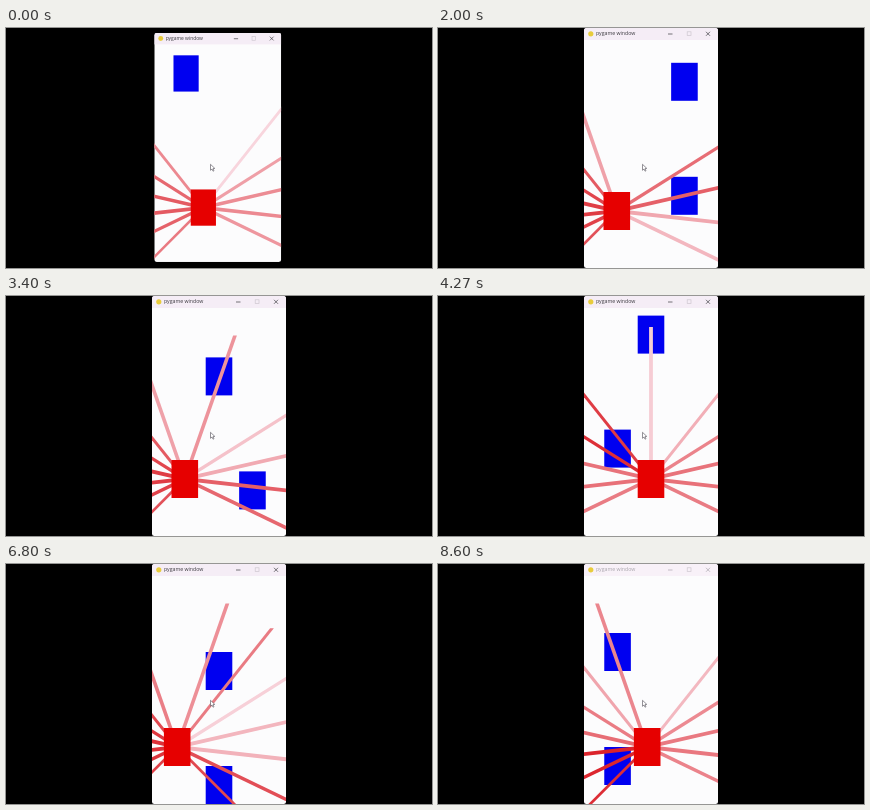
These frames come from a looping animation (426 by 240 pixels, 8670 ms). An HTML page with a canvas:

```html
<!DOCTYPE html>
<html lang="en">
<head>
<meta charset="utf-8">
<title>Lane dodger</title>
<style>
  html, body { margin: 0; width: 100%; height: 100%; overflow: hidden; background: #000; }
  canvas { display: block; width: 426px; height: 240px; }
</style>
</head>
<body>
<canvas id="stage" width="426" height="240"></canvas>
<script>
const ctx = document.getElementById('stage').getContext('2d');
const LOOP = 8670, TICK = 1000 / 15;

// World units: a 350 x 600 road, shown at 0.38 scale under the title bar.
const ROAD = { w: 350, h: 600 }, CAR = { w: 70, h: 100 };
const SCALE = 0.38, SPEED = 10, SPACING = 30, CAR_Y = 400;
const LANES = [52, 140, 228];
const RAYS = 15, RAY_LENGTH = 400, RAY_WIDTH = 10;

// [tick, simulation step]
const PACE = [[0, 0], [30, 183], [51, 310], [64, 389], [84, 510], [102, 617], [123, 744], [129, 762]];

// One lane per obstacle, and where the player waits while it passes.
const OBSTACLES = '01201220121201210201120100';
const DODGES = [130, 50, 50, 130, 50, 50, 50, 130, 50, 50, 50, 50, 140,
                50, 50, 50, 130, 130, 130, 30, 30, 30, 130, 50, 130, 130];

function stepAt(tick) {
  const i = Math.max(1, PACE.findIndex(([t]) => t >= tick));
  const [t0, s0] = PACE[i - 1], [t1, s1] = PACE[i];
  return Math.round(s0 + (s1 - s0) * (tick - t0) / (t1 - t0));
}

function playerX(step) {
  let x = 100;
  DODGES.forEach((goal, k) => {
    const moved = SPEED * Math.min(SPACING, step - SPACING * k - 17);
    if (moved > 0) x += Math.sign(goal - x) * Math.min(moved, Math.abs(goal - x));
  });
  return x;
}

function visibleObstacles(step) {
  return [...OBSTACLES]
    .map((lane, k) => ({ x: LANES[lane], y: 30 + SPEED * (step - SPACING * k) }))
    .filter(o => o.y > -CAR.h && o.y < ROAD.h);
}

// Distance along a ray to a box, or Infinity.
function boxDistance(ox, oy, dx, dy, box) {
  let near = 0, far = RAY_LENGTH;
  for (const [o, d, lo, hi] of [[ox, dx, box.x, box.x + CAR.w], [oy, dy, box.y, box.y + CAR.h]]) {
    if (Math.abs(d) < 1e-6) {
      if (o < lo || o > hi) return Infinity;
      continue;
    }
    const a = (lo - o) / d, b = (hi - o) / d;
    near = Math.max(near, Math.min(a, b));
    far = Math.min(far, Math.max(a, b));
  }
  return near <= far ? near : Infinity;
}

function wallDistance(ox, oy, dx, dy) {
  if (Math.abs(dx) < 1e-6) return Infinity;
  const d = ((dx > 0 ? ROAD.w : 0) - ox) / dx;
  return d <= RAY_LENGTH && oy + d * dy <= ROAD.h ? d : Infinity;
}

function drawRay(ox, oy, dx, dy, distance) {
  const u = distance / RAY_LENGTH, pale = Math.round(10 + 235 * u);
  const ex = ox + dx * RAY_LENGTH, ey = oy + dy * RAY_LENGTH;
  const steep = Math.abs(dy) > Math.abs(dx);
  const wx = steep ? RAY_WIDTH / 2 : 0, wy = steep ? 0 : RAY_WIDTH / 2;
  ctx.fillStyle = `rgb(${Math.round(215 + 38 * u)}, ${pale}, ${pale + 8})`;
  ctx.beginPath();
  ctx.moveTo(ox - wx, oy - wy);
  ctx.lineTo(ex - wx, ey - wy);
  ctx.lineTo(ex + wx, ey + wy);
  ctx.lineTo(ox + wx, oy + wy);
  ctx.fill();
}

function drawRoad(step) {
  const obstacles = visibleObstacles(step), x = playerX(step);
  const ox = x + CAR.w / 2, oy = CAR_Y + CAR.h / 2;
  ctx.save();
  ctx.translate(146.5, 12);
  ctx.scale(SCALE, SCALE);
  ctx.beginPath();
  ctx.rect(-2, 0, ROAD.w + 4, ROAD.h);
  ctx.clip();

  ctx.fillStyle = '#0000f0';
  for (const o of obstacles) ctx.fillRect(o.x, o.y, CAR.w, CAR.h);

  for (let i = 0; i < RAYS; i++) {
    const angle = (-135 + i * 270 / (RAYS - 1)) * Math.PI / 180;
    const dx = Math.sin(angle), dy = -Math.cos(angle);
    const distance = Math.min(wallDistance(ox, oy, dx, dy),
      ...obstacles.map(o => boxDistance(ox, oy, dx, dy, o)));
    if (distance < Infinity) drawRay(ox, oy, dx, dy, distance);
  }

  ctx.fillStyle = '#e60000';
  ctx.fillRect(x, CAR_Y, CAR.w, CAR.h);
  ctx.restore();
}

function drawTitleBar(active) {
  ctx.fillStyle = active ? '#f5edf6' : '#f8f1f8';
  ctx.fillRect(146, 0, 134, 12);
  ctx.fillStyle = '#e8cc3c';
  ctx.beginPath();
  ctx.arc(152.8, 5.8, 2.6, 0, 7);
  ctx.fill();

  const ink = active ? '#3c3a40' : '#a9a5ac';
  ctx.fillStyle = ctx.strokeStyle = ink;
  ctx.font = '5.2px "Open Sans", sans-serif';
  ctx.textBaseline = 'middle';
  ctx.fillText('pygame window', 158, 6);

  ctx.lineWidth = 0.7;
  ctx.beginPath();
  ctx.moveTo(230, 6); ctx.lineTo(234.5, 6);
  ctx.moveTo(268, 3.8); ctx.lineTo(272, 7.8);
  ctx.moveTo(272, 3.8); ctx.lineTo(268, 7.8);
  ctx.stroke();
  ctx.strokeStyle = '#cdc7cf';
  ctx.strokeRect(249.2, 3.8, 3.8, 3.8);
}

function drawPointer() {
  ctx.beginPath();
  [[204.5, 136.3], [204.5, 142.3], [206, 141], [207, 143.2], [208, 142.7], [207, 140.6], [208.8, 140.4]]
    .forEach(([x, y]) => ctx.lineTo(x, y));
  ctx.closePath();
  ctx.fillStyle = '#fff';
  ctx.strokeStyle = '#66646c';
  ctx.lineWidth = 0.7;
  ctx.fill();
  ctx.stroke();
}

function draw(time) {
  const tick = Math.min(129, Math.floor((time + 4) / TICK));
  const opening = Math.max(0, 1 - tick / 2) ** 2;

  ctx.fillStyle = '#000';
  ctx.fillRect(0, 0, 426, 240);
  ctx.save();
  ctx.translate(146 + 2.3 * opening, 5 * opening);
  ctx.scale(1 - 0.053 * opening, 1 - 0.046 * opening);
  ctx.translate(-146, 0);
  ctx.beginPath();
  ctx.roundRect(146, 0, 134, 240, 2.5);
  ctx.clip();
  ctx.fillStyle = '#fcfcfd';
  ctx.fillRect(146, 0, 134, 240);
  drawTitleBar(tick < 128);
  drawRoad(stepAt(tick));
  ctx.restore();
  drawPointer();
}

const start = performance.now();
function play() {
  draw((performance.now() - start) % LOOP);
  requestAnimationFrame(play);
}
play();
</script>
</body>
</html>
```
